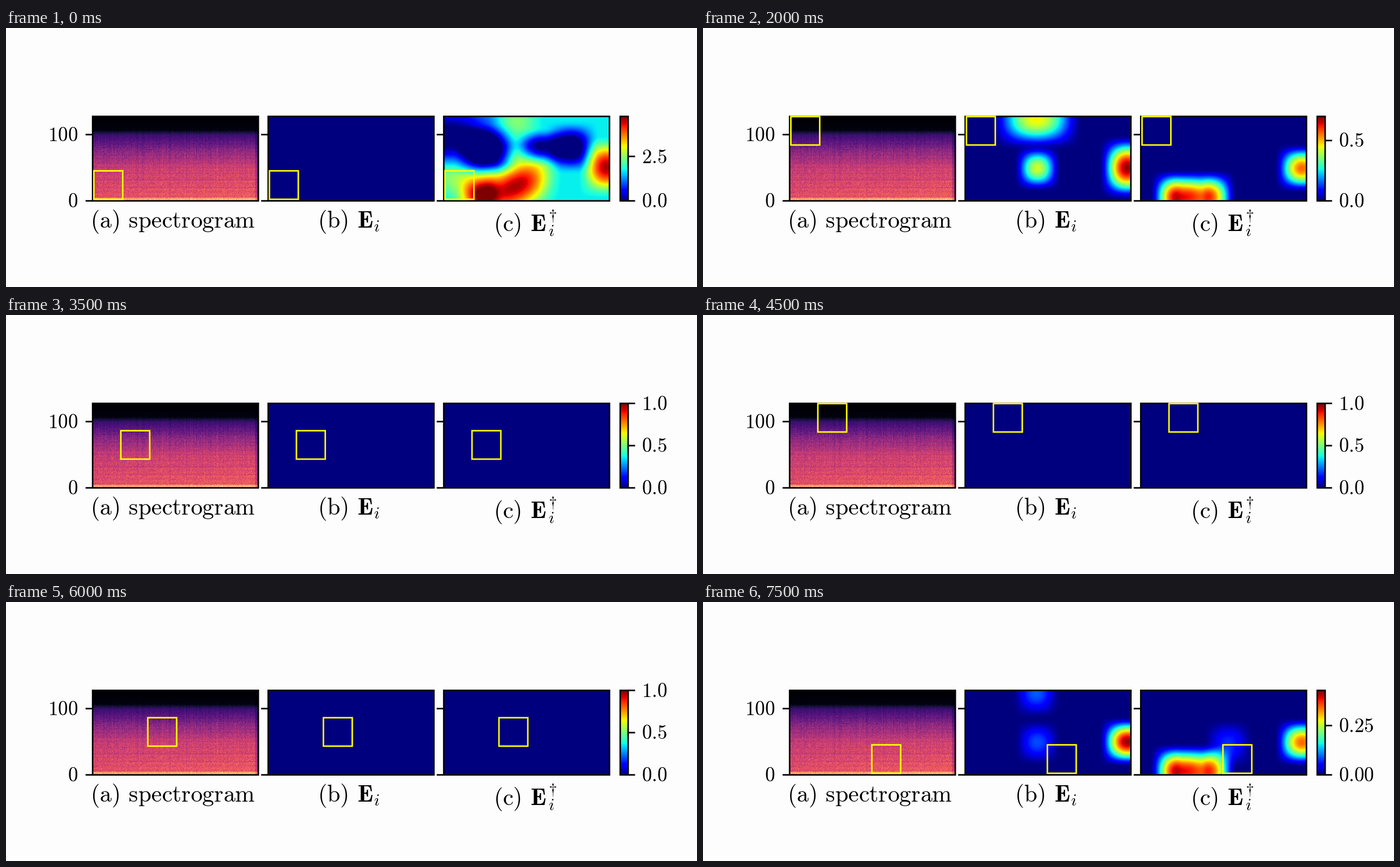
These frames come from a looping animation (1222x458 px, 8000 ms). A matplotlib script:

```python
import math

import numpy as np
import matplotlib.pyplot as plt
from matplotlib.animation import FuncAnimation
from matplotlib.patches import Rectangle

W, H, DPI = 1222, 458, 64
PT = 72 / DPI                       # points per pixel
TOP, BOTTOM = 156.3, 305.7
LEFTS = [153.2 + 310.5 * k for k in range(3)]
PW, PH = 293, 150                   # panel size
BAR_X, BAR_W = 1086.2, 14
LINE = 2.7
ROWS, STEP_X, STEP_Y = 5, 47.7, 24  # sliding window grid

plt.rcParams["mathtext.fontset"] = "cm"
fig = plt.figure(figsize=(W / DPI, H / DPI), dpi=DPI, facecolor="#fdfdfd")
ax = fig.add_axes([0, 0, 1, 1])
ax.axis("off")


def label(x, y, text, size, ha="left"):
    return ax.text(x, y, text, fontsize=size * PT, ha=ha, va="baseline")


def number(text):
    return rf"$\mathrm{{{text}}}$"


def image(data, x, width, cmap):
    return ax.imshow(data, extent=(x, x + width, BOTTOM, TOP), cmap=cmap,
                     vmin=0, vmax=1, aspect="auto", zorder=1)


def outline(x, y, w, h, color="black", zorder=4):
    return ax.add_patch(Rectangle((x, y), w, h, fill=False, ec=color, snap=False,
                                  lw=LINE * PT, zorder=zorder, joinstyle="miter"))


def tick(x0, x1, y):
    return ax.plot([x0, x1], [y, y], color="black", lw=LINE * PT,
                   solid_capstyle="butt", zorder=3, snap=False)[0]


def spectrogram():
    rng = np.random.default_rng(4)
    y = np.linspace(0, 1, 128)[:, None]
    x = np.linspace(0, 1, PW)[None, :]
    level = np.interp(y, [0, .16, .22, .44, .62, .96, .97, 1],
                      [0, .03, .2, .41, .56, .63, .8, .86])
    loud = np.clip((y - .1) / .3, 0, 1)
    streaks = rng.normal(0, .022, x.shape) * (1.3 - y)
    bands = rng.normal(0, .016, y.shape)
    grain = rng.normal(0, .042, (128, PW))
    tilt = .04 * (x - .5) * y - .12 * (x > .985)
    return np.clip(level + loud * (streaks + bands + grain + tilt), 0, 1)


def bump(d, width):
    return (1 - np.clip(d / width, -1, 1) ** 2) ** 2


def blobs(*items):
    """Sum of soft bumps (x, y, peak, half width, half height) in panel pixels."""
    x, y = np.arange(PW) + .5, np.arange(PH)[:, None] + .5
    return sum(a * bump(x - cx, wx) * bump(y - cy, wy)
               for cx, cy, a, wx, wy in items)


def landscape():
    """Rolling field that fills the whole panel."""
    valleys = blobs((10, 35, -.4, 120, 75), (75, 60, -.5, 60, 50),
                    (172, 56, -.4, 50, 36), (225, 55, -.5, 50, 48))
    ridges = blobs((100, 135, .55, 100, 55), (64, 142, .28, 44, 46),
                   (150, 100, .35, 60, 55), (288, 90, .6, 50, 55),
                   (10, 105, .15, 60, 50), (128, 8, .15, 50, 50))
    return .36 + valleys + ridges


def fading(col):
    """Both fields for a column: the centre spots weaken further to the right."""
    spread = 1 / col ** 3
    middle = blobs((125, 5, .65 / col, 42 + 40 * spread, 46 + 10 * spread),
                   (127, 92, .6 / col, 42, 42),
                   (285, 91, .98, 50, 44 + 14 * spread))
    right = blobs((64, 143, .95, 48, 50), (119, 143, .88, 51, 50),
                  (155, 95, .5 / col * (col > 1), 46, 46),
                  (285, 92, .8, 49, 44))
    return middle, right


def scene(step):
    """Middle field, right field, colour bar maximum and tick spacing."""
    col, row = divmod(step, ROWS)
    if step == 0:
        return EMPTY, HILLS, 4.75, 2.5
    if step == 1:
        return EMPTY, 1.4 * HILLS - .4, 1.6, 1
    if step == ROWS - 1:
        return *fading(1), .7, .5
    if row == 0:
        top = 1.19 / col ** .93
        return *fading(col), top, 2 ** math.floor(math.log2(top))
    return EMPTY, EMPTY, 1, .5


EMPTY = np.zeros((PH, PW))
HILLS = landscape()

# Static parts
image(spectrogram(), LEFTS[0], PW, "magma")
maps = [image(EMPTY, x, PW, "jet") for x in LEFTS[1:]]
image(np.linspace(1, 0, 256)[:, None], BAR_X, BAR_W, "jet")
outline(BAR_X, TOP, BAR_W, BOTTOM - TOP)
for left in LEFTS:
    outline(left, TOP, PW, BOTTOM - TOP)
    for y in (188.5, BOTTOM):
        tick(left - 12.5, left, y)
for y, text in ((188.5, "100"), (BOTTOM, "0")):
    label(127.4, y + 11.5, number(text), 35, "right")
SPACE = r"\ \hspace{0.07}"
label(149, 353, rf"$\mathrm{{(a)}}{SPACE}\mathrm{{spectrogram}}$", 41.7)
label(551, 353, rf"$\mathrm{{(b)}}{SPACE}\mathbf{{E}}_i$", 41.7)
label(862, 359, rf"$\mathrm{{(c)}}{SPACE}\mathbf{{E}}$", 41.7)
label(959, 340.5, r"$\dagger$", 29.2)
label(959, 368.5, "$i$", 29.2)

# Moving parts
windows = [outline(0, 0, 51, 50.3, "#ffff00", 5) for _ in LEFTS]
bar_ticks = [tick(BAR_X + BAR_W, 1112.5, 0) for _ in range(3)]
bar_labels = [label(1123.5, 0, "", 35) for _ in range(3)]
ax.set_xlim(0, W)
ax.set_ylim(H, 0)


def update(step):
    col, row = divmod(step, ROWS)
    for window, left in zip(windows, LEFTS):
        window.set_xy((left + 2.2 + col * STEP_X, 252.6 - row * STEP_Y))
    *fields, top, spacing = scene(step)
    for img, field in zip(maps, fields):
        img.set_data(np.clip(field, 0, 1))
    decimals = len(f"{spacing:g}".partition(".")[2])
    for k, (line, text) in enumerate(zip(bar_ticks, bar_labels)):
        value = k * spacing
        y = BOTTOM - value / top * (BOTTOM - TOP)
        line.set_ydata([y, y])
        text.set_y(y + 11.5)
        text.set_text(number(f"{value:.{decimals}f}"))
        for part in (line, text):
            part.set_visible(value <= top)
    return [*windows, *maps, *bar_ticks, *bar_labels]


anim = FuncAnimation(fig, update, frames=16, interval=500, repeat=True,
                     repeat_delay=0, blit=False)
plt.show()
```
